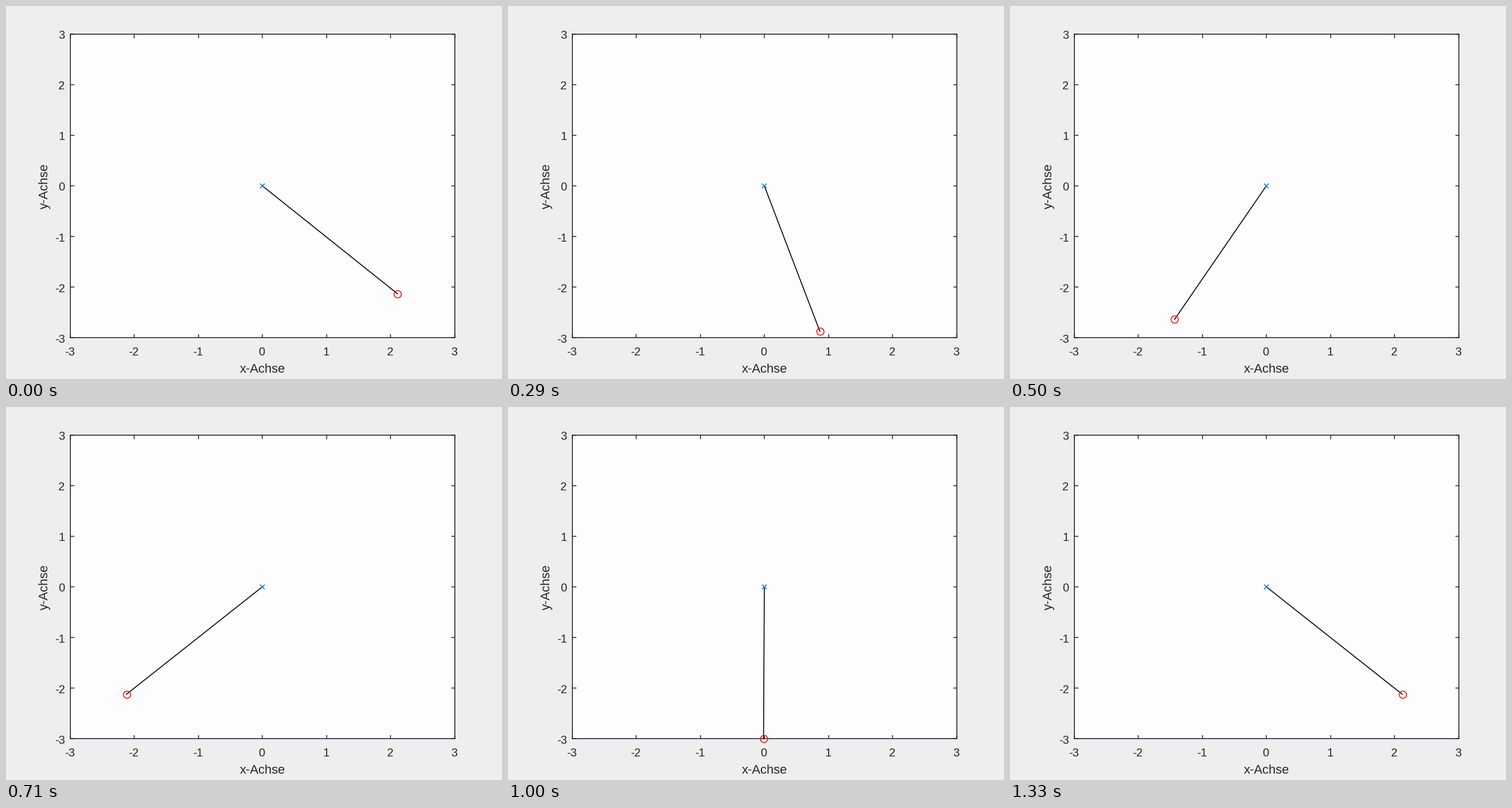
These frames come from a looping animation (863x649 px, 1.37 s). A matplotlib script:

```python
import matplotlib.pyplot as plt
import numpy as np
from matplotlib.animation import FuncAnimation

W, H, DPI = 863, 649, 100
PX = 72 / DPI                      # one pixel in points
LEFT, RIGHT, TOP, BOTTOM = 111.5, 780.5, 48.5, 577.3
LENGTH, SWING = 3, np.radians(45)
INK = "#262626"
TICKS = range(-3, 4)

# swing phase in degrees at a few steps of the motion
KEY_STEPS = [0, 7, 12, 17, 24, 28, 32]
KEY_PHASES = [-6.6, 68.1, 129.3, 181, 269.7, 318.3, 360]

plt.rcParams["font.family"] = "Liberation Sans"
fig = plt.figure(figsize=(W / DPI, H / DPI), dpi=DPI, facecolor="#eeeeee")
ax = fig.add_axes([LEFT / W, 1 - BOTTOM / H, (RIGHT - LEFT) / W, (BOTTOM - TOP) / H],
                  facecolor="#fdfdfd")
ax.set(xlim=(-3, 3), ylim=(-3, 3), xticks=TICKS, yticks=TICKS)
ax.tick_params(direction="in", length=6.5 * PX, width=1.5 * PX, color=INK,
               top=True, right=True, labelbottom=False, labelleft=False)
for spine in ax.spines.values():
    spine.set(color=INK, linewidth=1.6 * PX)
ax.spines["bottom"].set_color("#26223c")


def label(x, y, text, size, ha="center", **kw):
    fig.text(x / W, 1 - y / H, text, fontsize=size * PX, color=INK,
             ha=ha, va="baseline", **kw)


for v in TICKS:
    share = (v + 3) / 6
    label(LEFT + share * (RIGHT - LEFT) - 0.7, 607.5, str(v), 20)
    label(102.5, BOTTOM - share * (BOTTOM - TOP) + 8.5, str(v), 20, ha="right")
label(446, 638, "x-Achse", 22)
label(73, 313, "y-Achse", 22, rotation=90, rotation_mode="anchor")

ax.plot(0, 0, "x", color="#0072bd", markersize=8.5 * PX,
        markeredgewidth=1.5 * PX, clip_on=False, zorder=4)
rod, = ax.plot([], [], color="black", linewidth=1.6 * PX, clip_on=False, zorder=3)
bob, = ax.plot([], [], "o", markersize=12.5 * PX, markerfacecolor="none",
               markeredgecolor="red", markeredgewidth=1.5 * PX,
               clip_on=False, zorder=5)
bob.set_snap(False)


def draw(tick):
    # 24 steps per second, on a 10 ms clock
    step = (6 * tick + 2) // 25
    phase = np.radians(np.interp(step, KEY_STEPS, KEY_PHASES))
    angle = SWING * np.cos(phase)
    x, y = LENGTH * np.sin(angle), -LENGTH * np.cos(angle)
    rod.set_data([0, x], [0, y])
    bob.set_data([x], [y])
    return rod, bob


anim = FuncAnimation(fig, draw, frames=137, interval=10, repeat=True,
                     repeat_delay=0, blit=False)
plt.show()
```
